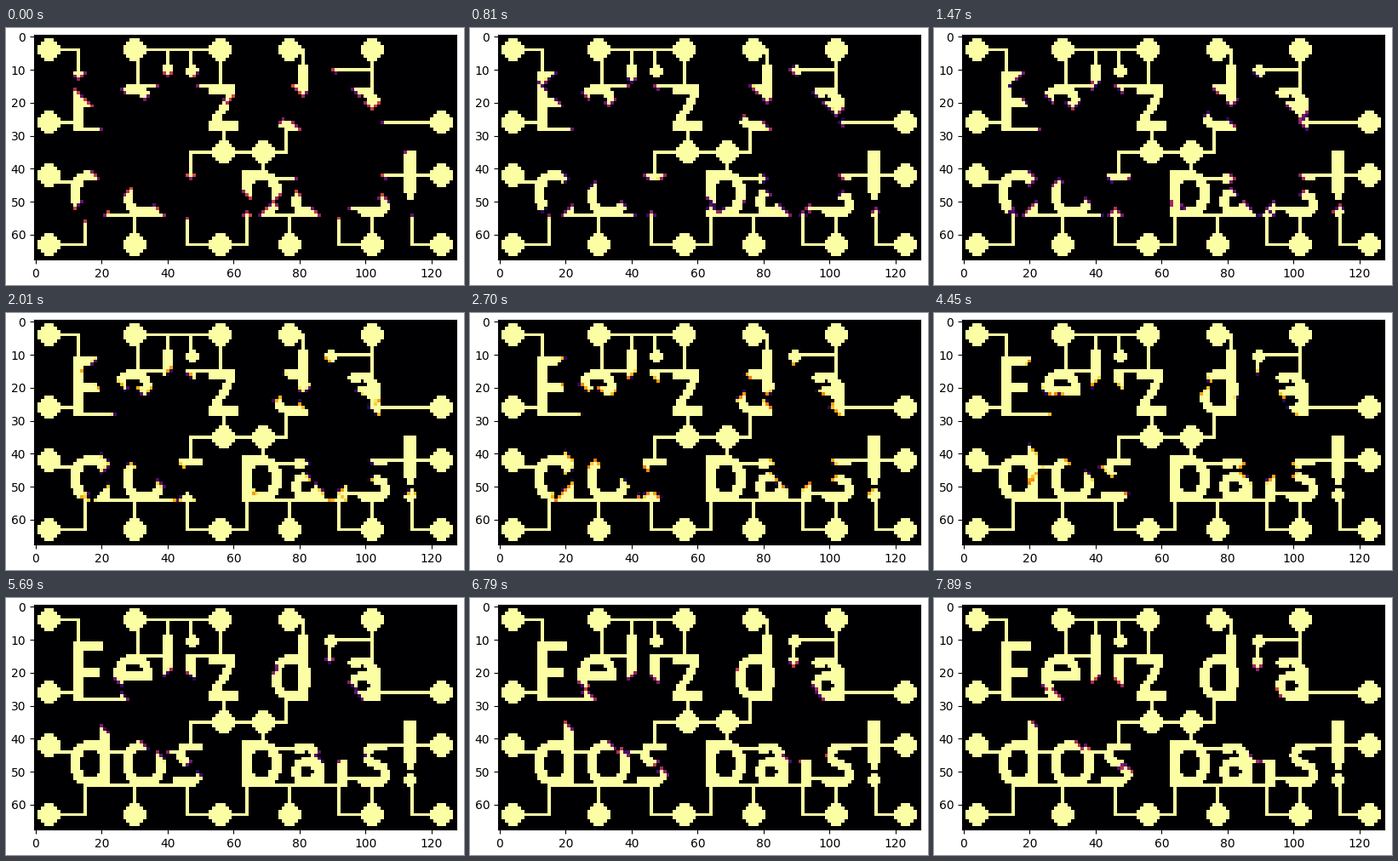
A matplotlib script for the animation above (8000 ms loop, 538 px wide and 302 px high).

```python
import numpy as np
import matplotlib.pyplot as plt
from matplotlib.animation import FuncAnimation

WIDTH, HEIGHT, DPI = 538, 302, 100
COLS, ROWS, CELL = 128, 68, 3.875
LEFT, TOP = 32.9, 8.4
LOOP, INTERVAL, STEPS = 8000, 40, 59

mask = np.zeros((ROWS, COLS), bool)
yy, xx = np.mgrid[:ROWS, :COLS]


def rect(x0, y0, x1, y1):
    """Fill whole cells, both corners included."""
    mask[min(y0, y1):max(y0, y1) + 1, min(x0, x1):max(x0, x1) + 1] = True


def disc(x, y, r):
    mask[(xx - x) ** 2 + (yy - y) ** 2 <= r * r] = True


def wire(*points):
    for a, b in zip(points, points[1:]):
        rect(*a, *b)


def stroke(*points, r=1.4):
    for (x0, y0), (x1, y1) in zip(points, points[1:]):
        for u in np.linspace(0, 1, 12):
            disc(x0 + u * (x1 - x0), y0 + u * (y1 - y0), r)


def arc(x, y, rx, ry, start=0, end=360):
    """Elliptic band, three cells thick; angles run clockwise from the right."""
    for a in np.radians(np.linspace(start, end, 90)):
        disc(x + (rx - 1.4) * np.cos(a), y + (ry - 1.4) * np.sin(a), 1.45)


def letter_a(x, base):
    rect(x + 7, base - 9, x + 9, base)
    stroke((x + 1, base - 11), (x + 4.5, base - 11.6), (x + 7.6, base - 9.5))
    arc(x + 4.4, base - 4, 4.8, 4.5)


def letter_s(x):
    stroke((x + 6, 42.6), (x + 2.2, 42.6), (x + 0.8, 45), (x + 2.6, 47.3),
           (x + 6, 48.7), (x + 7.2, 51), (x + 5.4, 52.9), (x, 52.9), r=1.35)


def first_line():
    # F
    rect(12, 11, 14, 28)
    rect(12, 11, 20, 13)
    rect(12, 19, 19, 21)
    # e
    arc(29.6, 21.5, 6, 7, 40, 360)
    rect(25, 20, 35, 22)
    # l, i
    rect(39, 9, 41, 28)
    disc(47.5, 10.5, 1.7)
    rect(46, 15, 48, 28)
    # z
    rect(53, 15, 60, 17)
    stroke((59.3, 17.5), (54.5, 25.5), r=1.25)
    rect(53, 26, 61, 28)
    # d
    rect(80, 9, 82, 28)
    arc(77.4, 21.5, 6, 7)
    # i
    disc(89.5, 10.5, 1.7)
    rect(88, 16, 90, 28)
    letter_a(95, 28)


def second_line():
    # d
    rect(20, 35, 22, 54)
    arc(16.7, 47.5, 6.2, 7)
    # o, s
    arc(33, 47.5, 6.7, 7)
    letter_s(42.8)
    # p
    rect(63, 41, 65, 54)
    arc(68.3, 47.5, 6.2, 7)
    letter_a(78, 54)
    # i, s
    rect(92, 47, 94, 54)
    letter_s(99.3)
    # !
    rect(112, 35, 115, 47)
    rect(113, 48, 114, 49)
    disc(113.5, 52.5, 1.7)


def wires():
    wire((4, 4), (13, 4), (13, 11))
    wire((4, 26), (12, 26))
    wire((13, 28), (31, 28))
    wire((30, 4), (56, 4), (56, 15))
    wire((31, 4), (31, 15), (39, 15))
    wire((40, 4), (40, 9))
    wire((47, 4), (47, 9))
    wire((47, 15), (54, 15))
    wire((77, 4), (81, 4), (81, 9))
    wire((102, 4), (102, 16))
    wire((102, 10), (89, 10), (89, 16))
    wire((123, 26), (104, 26))
    wire((57, 28), (57, 35))
    wire((47, 42), (47, 35), (76, 35), (76, 28))
    wire((69, 35), (69, 41))
    wire((4, 44), (12, 44))
    wire((22, 44), (28, 44))
    wire((39, 44), (43, 44))
    wire((4, 63), (15, 63), (15, 54))
    wire((20, 54), (48, 54))
    wire((30, 63), (30, 54))
    wire((46, 54), (46, 63), (64, 63), (64, 54))
    wire((73, 43), (80, 43))
    wire((69, 54), (94, 54))
    wire((77, 63), (77, 54))
    wire((87, 47), (92, 47))
    wire((92, 54), (92, 63), (102, 63), (102, 53))
    wire((94, 52), (100, 52))
    wire((123, 42), (105, 42))
    wire((123, 63), (114, 63), (114, 54))


def spread(sources):
    """Steps along the lit paths from the nearest source to every cell."""
    dist = np.full((ROWS, COLS), 999.0)
    edge = list(sources)
    for x, y in edge:
        dist[y, x] = 0
    for x, y in edge:
        for nx, ny in ((x + 1, y), (x - 1, y), (x, y + 1), (x, y - 1)):
            if (0 <= nx < COLS and 0 <= ny < ROWS
                    and mask[ny, nx] and dist[ny, nx] == 999):
                dist[ny, nx] = dist[y, x] + 1
                edge.append((nx, ny))
    return dist


nodes = [(x, y) for y in (4, 63) for x in (4, 30, 56, 77, 102)]
nodes += [(123, 63), (4, 26), (123, 26), (57, 35), (69, 35), (4, 42), (123, 42)]
for node in nodes:
    disc(*node, 3.2)
first_line()
second_line()
wires()

jitter = np.random.default_rng(4).uniform(-0.2, 0.2, mask.shape)
arrival = spread(nodes) + jitter


def glow(step):
    reach = 17.5 + 10 * (step / (STEPS - 1)) ** 0.75
    return np.clip((reach - arrival + 1) / 1.2, 0, 1)


fig = plt.figure(figsize=(WIDTH / DPI, HEIGHT / DPI), dpi=DPI, facecolor="white")
w, h = COLS * CELL, ROWS * CELL
ax = fig.add_axes([LEFT / WIDTH, 1 - (TOP + h) / HEIGHT, w / WIDTH, h / HEIGHT])
image = ax.imshow(glow(0), cmap="inferno", vmin=0, vmax=1, aspect="auto")
ax.set_xticks(range(0, 121, 20))
ax.set_yticks(range(0, 61, 10))


def update(frame):
    step = int((frame * INTERVAL + 55) * STEPS / LOOP)
    image.set_data(glow(min(step, STEPS - 1)))
    return [image]


anim = FuncAnimation(fig, update, frames=LOOP // INTERVAL, interval=INTERVAL,
                     repeat=True, repeat_delay=0)
plt.show()
```
